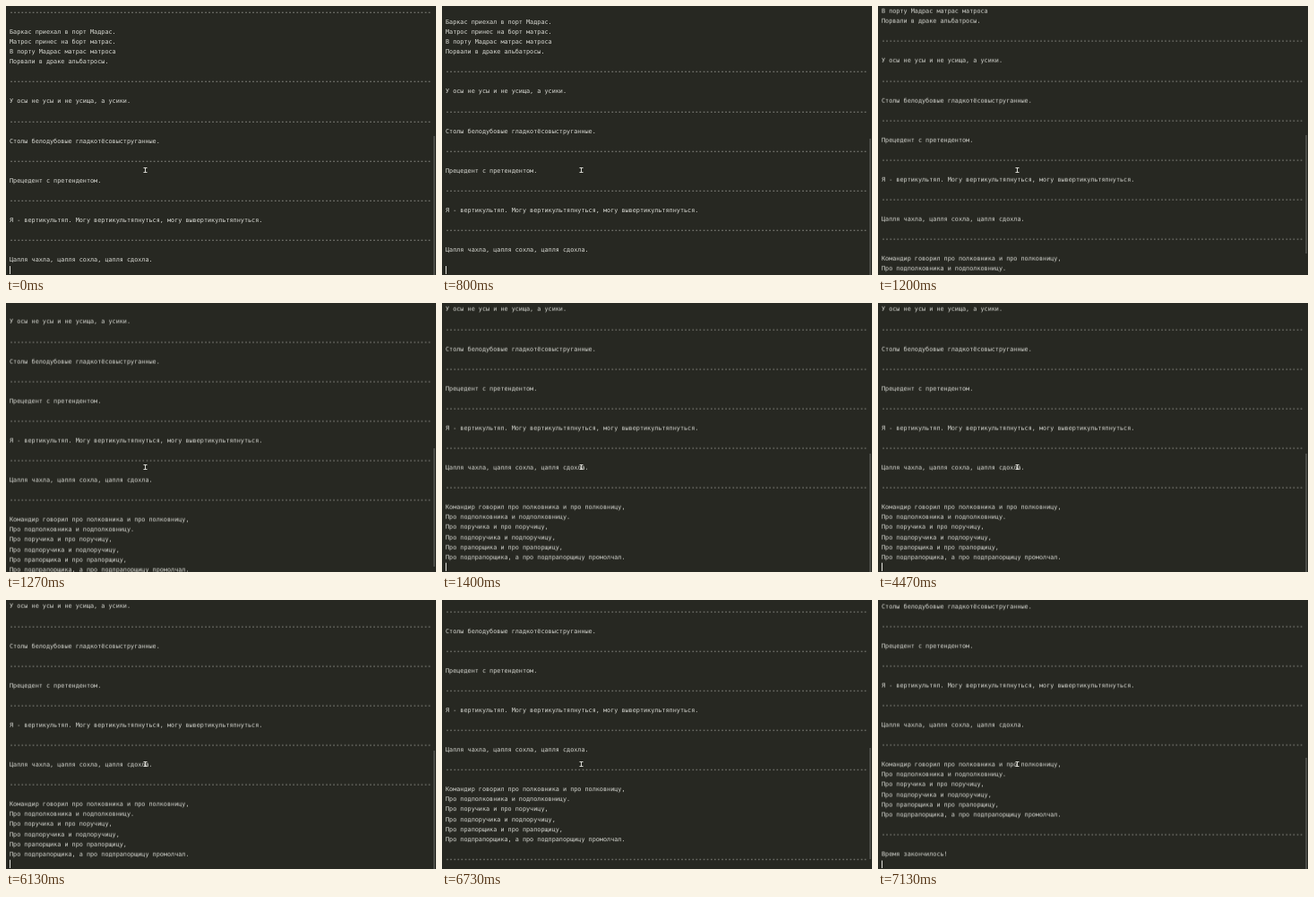
Animation of 480 by 300 pixels, one loop 8 s. Source, as an HTML page:

```html
<!DOCTYPE html>
<html lang="ru">
<head>
<meta charset="utf-8">
<title>Скороговорки</title>
<style>
html, body { margin: 0; width: 100%; height: 100%; overflow: hidden; background: #272822; }
#stage { position: relative; width: 480px; height: 300px; overflow: hidden; }
#page { position: absolute; left: 4px; top: 1.6px; will-change: transform; }
pre {
  margin: 0; color: #d9dad4; white-space: pre;
  font: 6.8px/11.04px "DejaVu Sans Mono", "Noto Sans Mono", monospace;
  text-rendering: geometricPrecision; font-variant-ligatures: none;
}
#caret { position: absolute; left: 0; width: 1px; height: 9px; background: #e4e4de; }
#thumb { position: absolute; left: 477px; width: 2px; background: #4b4c47; }
#mouse { position: absolute; left: 152px; top: 179px; }
</style>
</head>
<body>
<div id="stage">
  <div id="page"><pre id="text"></pre><div id="caret"></div></div>
  <div id="thumb"></div>
  <svg id="mouse" width="7" height="8" fill="none" stroke="#d6d6d0">
    <path d="M1.5 1.5H5.5M3.5 1.5V6.5M1.5 6.5H5.5"/>
  </svg>
</div>
<script>
const LOOP = 8000, ROW = 11.04, VIEW = 300, FIRST_CARET = 26, BASE_HEIGHT = 582;
const rule = "-".repeat(115);
const verses = [
  "Баркас приехал в порт Мадрас.\nМатрос принес на борт матрас.\nВ порту Мадрас матрас матроса\nПорвали в драке альбатросы.\n",
  "У осы не усы и не усища, а усики.",
  "Столы белодубовые гладкотёсовыструганные.",
  "Прецедент с претендентом.",
  "Я - вертикультяп. Могу вертикультяпнуться, могу вывертикультяпнуться.",
  "Цапля чахла, цапля сохла, цапля сдохла.",
  "Командир говорил про полковника и про полковницу,\nПро подполковника и подполковницу.\nПро поручика и про поручицу,\nПро подпоручика и подпоручицу,\nПро прапорщика и про прапорщицу,\nПро подпрапорщика, а про подпрапорщицу промолчал.\n",
  "Время закончилось!"
];
const lines = verses.map(v => `${rule}\n\n${v}\n`).join("\n").split("\n");
// The first and the long verse carry one blank row before the next rule.
const rows = lines.filter((s, i) => s || lines[i - 1]);

// [time, caret row]: everything above the caret has been printed
const prints = [[0, 26], [800, 27], [1200, 35], [6730, 39]];
// [time, rows scrolled]
const scrolls = [
  [0, 0], [800, 1], [1200, 4.1], [1270, 7.74], [1330, 8.77], [1400, 9],
  [6730, 10.5], [6800, 12.37], [6870, 12.88], [6930, 13]
];
const blinks = [[0, 1], [2800, 0], [4070, 1], [5070, 0], [6130, 1]];
const at = (table, t) => table.findLast(step => step[0] <= t)[1];

const $ = id => document.getElementById(id);
const text = $("text"), page = $("page"), caret = $("caret"), thumb = $("thumb");
let printed = -1;

function draw(t) {
  const row = at(prints, t), scroll = at(scrolls, t) * ROW;
  if (row !== printed) {
    text.textContent = rows.slice(0, row).join("\n");
    caret.style.top = row * ROW + 1 + "px";
    printed = row;
  }
  page.style.transform = `translateY(${-scroll}px)`;
  caret.style.opacity = at(blinks, t);

  const max = (row - FIRST_CARET) * ROW, total = BASE_HEIGHT + max;
  thumb.style.top = VIEW * (total - VIEW - max + scroll) / total + "px";
  thumb.style.height = VIEW * VIEW / total + "px";
}

const start = performance.now();
function tick() {
  draw((performance.now() - start) % LOOP);
  requestAnimationFrame(tick);
}
draw(0);
requestAnimationFrame(tick);
</script>
</body>
</html>
```
